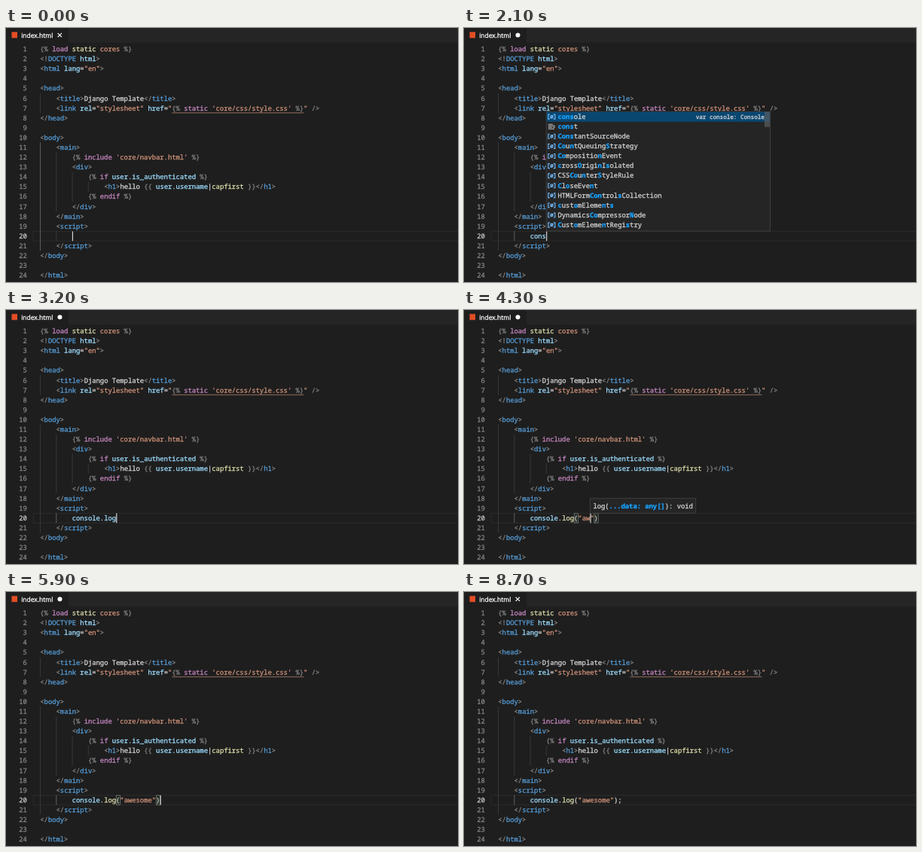
Write an HTML page that moves like this. It is 600x338 px and loops after 9 s.

```html
<!DOCTYPE html>
<html lang="en">
<head>
<meta charset="utf-8">
<title>Editor typing</title>
<style>
  html, body { margin: 0; width: 100%; height: 100%; overflow: hidden; background: #1e1e1e; }
  svg { display: block; width: 600px; height: 338px; }
  text { white-space: pre; text-rendering: geometricPrecision; stroke-width: .3px; }
  .mono { font: 500 8.84px "Noto Sans Mono", "DejaVu Sans Mono", monospace; }
  .ui { font: 8.5px "Open Sans", "Noto Sans", sans-serif; }
</style>
</head>
<body>
<svg id="stage" viewBox="0 0 600 338" xmlns="http://www.w3.org/2000/svg"></svg>
<script>
const LOOP = 9000, CH = 5.304, LH = 13.09, LEFT = 45.3, EDIT = 20;
const COLORS = {
  p: '#808080', t: '#569cd6', a: '#9cdcfe', s: '#ce9178', w: '#d4d4d4',
  f: '#dcdcaa', k: '#c586c0', h: '#18a3ff'
};

// "~x" switches to colour x; leading spaces are the indent
const CODE = [
  '~p{% ~kload ~fstatic ~scores ~p%}',
  '~p<!~tDOCTYPE ~ahtml~p>',
  '~p<~thtml ~alang~w=~s"en"~p>',
  '',
  '~p<~thead~p>',
  '    ~p<~ttitle~p>~wDjango Template~p</~ttitle~p>',
  '    ~p<~tlink ~arel~w=~s"stylesheet" ~ahref~w=~s"~p{% ~kstatic ~s\'core/css/style.css\' ~p%}~s" ~p/>',
  '~p</~thead~p>',
  '',
  '~p<~tbody~p>',
  '    ~p<~tmain~p>',
  '        ~p{% ~kinclude ~s\'core/navbar.html\' ~p%}',
  '        ~p<~tdiv~p>',
  '            ~p{% ~kif ~auser.is_authenticated ~p%}',
  '                ~p<~th1~p>~whello ~p{{ ~auser.username~w|~fcapfirst ~p}}</~th1~p>',
  '            ~p{% ~kendif ~p%}',
  '        ~p</~tdiv~p>',
  '    ~p</~tmain~p>',
  '    ~p<~tscript~p>',
  '',
  '    ~p</~tscript~p>',
  '~p</~tbody~p>',
  '',
  '~p</~thtml~p>'
];

const GLOBALS = ['console', 'const', 'ConstantSourceNode', 'CountQueuingStrategy', 'CompositionEvent',
  'crossOriginIsolated', 'CSSCounterStyleRule', 'CloseEvent', 'HTMLFormControlsCollection',
  'customElements', 'DynamicsCompressorNode', 'CustomElementRegistry'];
const METHODS = ['log', 'assert', 'clear', 'count', 'countReset', 'debug', 'dir', 'dirxml', 'error',
  'group', 'groupCollapsed', 'groupEnd'];
const L_METHODS = ['log', 'clear', 'dirxml', 'groupCollapsed', 'table', 'timeLog'];
const LOG_METHODS = ['log', 'timeLog'];

// [start, typed text, caret column, completion list, signature hint]
const STEPS = [
  [0, '', 0],
  [1400, 'c', 1],
  [1800, 'co', 2, GLOBALS],
  [1900, 'con', 3, GLOBALS],
  [2100, 'cons', 4, GLOBALS],
  [2400, 'console', 7],
  [2800, 'console.', 8, METHODS],
  [2900, 'console.l', 9, L_METHODS],
  [3000, 'console.lo', 10, LOG_METHODS],
  [3100, 'console.log', 11, LOG_METHODS],
  [3200, 'console.log', 11],
  [3500, 'console.log()', 12],
  [3600, 'console.log()', 12, null, true],
  [3800, 'console.log("")', 13, null, true],
  ...[4200, 4300, 4500, 4700, 4900, 5000, 5200].map((t, i) =>
    [t, `console.log("${'awesome'.slice(0, i + 1)}")`, 14 + i, null, true]),
  [5500, 'console.log("awesome")', 22, null, true],
  [5700, 'console.log("awesome")', 22],
  [6100, 'console.log("awesome");', 23]
];
const CARET_OFF = [[100, 600], [1100, 1400], [6700, 7200], [7800, 8200], [8700, LOOP]];

const esc = s => s.replace(/&/g, '&amp;').replace(/</g, '&lt;');
const colX = col => LEFT + col * CH;
const midY = line => 28 + (line - 1) * LH;
const rect = (x, y, w, h, fill, more = '') =>
  `<rect x="${x}" y="${y}" width="${w}" height="${h}" fill="${fill}" ${more}/>`;
const frame = (x, y, w, h) => rect(x + .4, y + .4, w - .8, h - .8, '#252526', 'stroke="#454545" stroke-width=".8"');
const path = (d, color, width = 1) => `<path d="${d}" fill="none" stroke="${color}" stroke-width="${width}"/>`;
const ink = color => `fill="${color}" stroke="${color}"`;
const text = (x, y, body, more = '', color = COLORS.w) =>
  `<text class="mono" x="${x}" y="${y}" ${ink(color)} ${more}>${body}</text>`;

function tint(line) {
  return line.split('~').slice(1).map(s =>
    `<tspan ${ink(COLORS[s[0]])}${s[0] === 'h' ? ' font-weight="700"' : ''}>${esc(s.slice(1))}</tspan>`).join('');
}

function codeLine(line, i) {
  const indent = line.search(/\S|$/), n = i + 1;
  return text(27.8, midY(n) + 3.1, n, 'text-anchor="end"', n === EDIT ? '#c6c6c6' : '#858585') +
    text(colX(indent), midY(n) + 3.1, tint(line));
}

function guide(col, from, to, color = '#404040') {
  return path(`M${colX(col) + .3} ${midY(from) - LH / 2}V${midY(to) + LH / 2}`, color, .8);
}

function typedLine(s) {
  return s.replace(/"\w*"|console|log(?=\()|\w+|[.();]/g, m =>
    (m[0] === '"' ? '~s' : m === 'log' && s.includes('(') ? '~f' : /\w/.test(m) ? '~a' : '~w') + m);
}

// Highlights the letters of a label that match the typed word
function mark(label, word) {
  const low = label.toLowerCase(), hits = new Set();
  let pos = Math.max(0, low.indexOf(word.slice(0, 2)));
  for (const c of word) {
    let at = low[pos] === c ? pos : label.indexOf(c.toUpperCase(), pos);
    if (at < 0) at = low.indexOf(c, pos);
    if (at < 0) break;
    hits.add(at);
    pos = at + 1;
  }
  return tint([...label].map((c, i) => (hits.has(i) ? '~h' : '~w') + c).join(''));
}

function icon(x, y, label, list) {
  if (label === 'const')
    return path(`M${x} ${y - 3}h6M${x} ${y - 1}h9M${x} ${y + 1}h5m1 0h3M${x} ${y + 3}h8`, '#c5c5c5', 1);
  if (list !== GLOBALS)
    return path(`M${x + 1} ${y - 1.5}l3.5 -2 3.5 2v3.5l-3.5 2 -3.5 -2zl3.5 2 3.5 -2m-3.5 2v3.5`, '#b180d7', .9);
  return path(`M${x + 2} ${y - 3}h-2v6h2M${x + 7} ${y - 3}h2v6h-2M${x + 3} ${y + 2}l3.4 -4`, '#75beff', 1.1) +
    `<circle cx="${x + 4.6}" cy="${y}" r="1.7" fill="none" stroke="#75beff" stroke-width="1.1"/>`;
}

function popup(x, list, word) {
  const w = 298, h = list.length * LH + 2.6;
  const y = list.length > 2 ? midY(EDIT) - LH / 2 + .4 - h : midY(EDIT) + LH / 2 + .4;
  let out = frame(x, y, w, h) + rect(x + .8, y + .8, w - 1.6, LH, '#094771');
  list.forEach((label, i) => {
    const cy = y + .7 + (i + .5) * LH;
    out += icon(x + 3, cy, label, list) + text(x + 15.6, cy + 2.8, mark(label, word));
  });
  const note = list === GLOBALS ? 'var console: Console' : '(method) Console.log';
  out += text(x + 290, y + 10, note, 'text-anchor="end" style="font-size:7.6px"');
  if (list.length > 11) out += rect(x + 290, y + .8, 7, 20, '#5a5d60', 'opacity=".7"');
  return out;
}

function hint(x) {
  return frame(x, 250.3, 141, 20.4) + text(x + 4.3, 263.5, tint('~wlog(~h...data: any[]~w): void'));
}

const bracket = col => rect(colX(col) + .2, 270.8, CH, 12.4, 'rgba(0,100,0,.1)', 'stroke="#888" stroke-width=".7"');

const BACK = rect(0, 0, 600, 338, '#1e1e1e') + rect(83, 0, 517, 19.5, '#252526') +
  rect(7.5, 5.3, 7.5, 8, '#e44d26') +
  `<text class="ui" x="20.2" y="12.8" ${ink('#fff')}>index.html</text>` +
  rect(36, 270.6, 566, 12.6, 'none', 'stroke="#282828" stroke-width="1.2"');
const LINES = guide(0, 6, 7) + guide(4, 12, 17) + guide(8, 14, 16) + guide(12, 15, 15) +
  CODE.map(codeLine).join('') + path(`M${colX(33)} 112.9H${colX(66)}`, '#b58370', .8);
const CLOSE = path('M68.6 6.8l5.4 5.4m0 -5.4l-5.4 5.4', '#fff', 1.2);
const DOT = '<circle cx="71.5" cy="9.6" r="3" fill="#fff"/>';

function render(t) {
  const [, typed, caret, list, sig] = STEPS.filter(s => s[0] <= t).pop();
  const x = colX(8 + caret);
  let out = BACK + (t >= 1400 && t < 7500 ? DOT : CLOSE);
  out += guide(0, 11, 21, typed ? '#404040' : '#707070') + guide(4, EDIT, EDIT, typed ? '#707070' : '#404040') + LINES;
  if (typed.includes('(') && caret < 23) out += bracket(19) + bracket(8 + typed.indexOf(')'));
  out += text(colX(8), midY(EDIT) + 3.1, tint(typedLine(typed)));
  if (!CARET_OFF.some(([a, b]) => t >= a && t < b)) out += rect(x + .1, 270.6, 1.2, 12.8, '#d4d4d4');
  if (list) out += popup(x - .1, list, typed.split('.').pop());
  if (sig) out += hint(x - .2);
  return out;
}

const stage = document.getElementById('stage');
const start = performance.now();
let shown = '';
function tick() {
  const next = render((performance.now() - start) % LOOP);
  if (next !== shown) stage.innerHTML = shown = next;
  requestAnimationFrame(tick);
}
tick();
</script>
</body>
</html>
```
